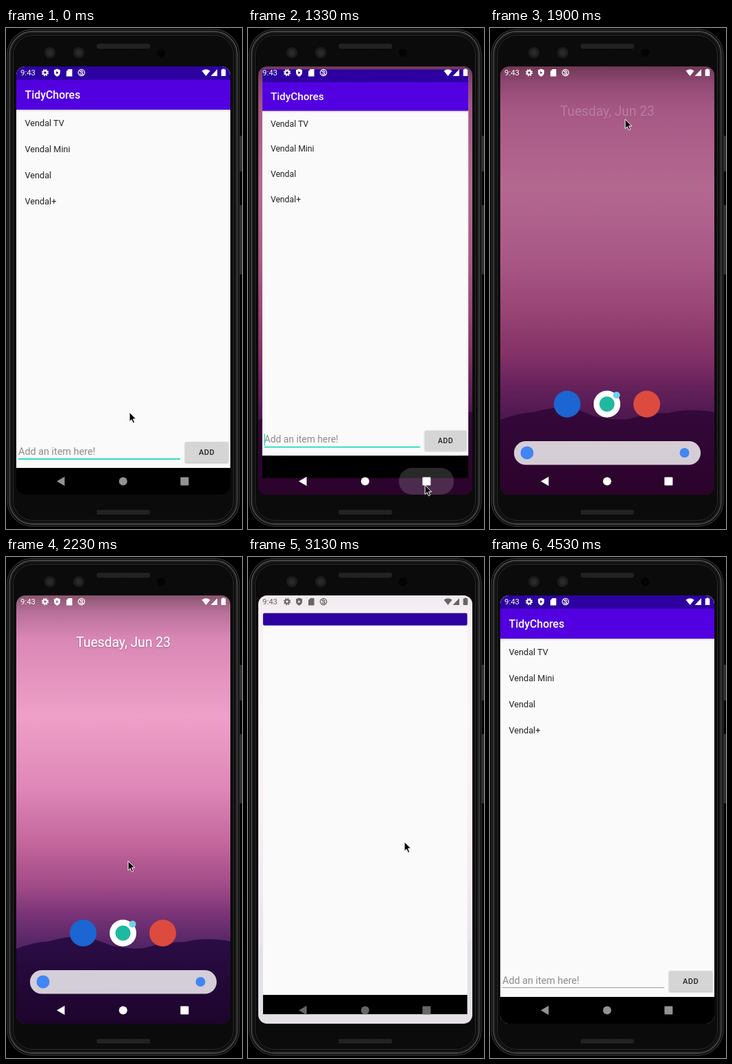
Write an HTML page that moves like this. It is 344 by 730 pixels and loops after 4560 ms.

```html
<!DOCTYPE html>
<html lang="en">
<head>
<meta charset="utf-8">
<style>
  html, body { margin: 0; width: 100%; height: 100%; overflow: hidden; background: #000; }
  svg { display: block; width: 344px; height: 730px; font-family: Roboto, sans-serif; }
</style>
</head>
<body>
<svg id="stage" viewBox="0 0 344 730"></svg>
<script>
const LOOP = 4560;
const items = ['Vendal TV', 'Vendal Mini', 'Vendal', 'Vendal+'];

// label, mark colour, sits on a white disc
const apps = [
  ['Daybooks', '#3f6fd8', 1], ['Lenses', '#4a78d0', 0], ['Pagers', '#dd4b3e', 0], ['Hours', '#5585e0', 0], ['Entries', '#1a8fd6', 1],
  ['Shelf', '#f5b912', 1], ['Gab', '#1a5fd0', 0], ['Racks', '#3f72dc', 0], ['Mails', '#d93a30', 1], ['Dorvit', '#4285f4', 1],
  ['Roam', '#4c9a5c', 0], ['Textings', '#1b66d2', 0], ['Calls', '#0a8ae0', 1], ['Images', '#f0b400', 1], ['Reel Fil…', '#a01030', 1],
  ['Wave Songs', '#f05a20', 1], ['Wave Shop', '#20b8a0', 1], ['Controls', '#1b58c4', 0], ['TidyCho…', '#3ddc84', 0], ['Vidmoor', '#f00000', 1]
];

const rect = (x, y, w, h, fill, more = '') =>
  `<rect x="${x}" y="${y}" width="${w}" height="${h}" fill="${fill}" ${more}/>`;
const circle = (x, y, r, fill, more = '') =>
  `<circle cx="${x}" cy="${y}" r="${r}" fill="${fill}" ${more}/>`;
const text = (x, y, size, fill, str, more = '') =>
  `<text x="${x}" y="${y}" font-size="${size}" fill="${fill}" ${more}>${str}</text>`;
const stops = list => list.map(([at, c]) => `<stop offset="${at}" stop-color="${c}"/>`).join('');

const icon = (x, y, [, colour, disc]) => disc
  ? circle(x, y, 19.5, '#fff', 'filter="url(#soft)"') + circle(x, y, 11, colour)
  : circle(x, y, 19.5, colour);
const badge = (x, y) => circle(x, y, 5, '#6cd3ee');

const hotseat = [11, 16, 2].map((n, i) => icon(112.5 + 58 * i, 548, apps[n])).join('') + badge(184.5, 535);

const grid = apps.map((app, i) => {
  const x = 54.5 + i % 5 * 58, y = 169.5 + Math.floor(i / 5) * 85.2;
  return icon(x, y, app) + text(x, y + 37.5, 9.55, '#666', app[0], 'text-anchor="middle"');
}).join('') + badge(126, 411.5);

const ring = (inset, colour, width) => rect(1 + inset, 1 + inset, 340 - 2 * inset, 726 - 2 * inset,
  'none', `rx="${38 - inset}" stroke="${colour}" stroke-width="${width}"`);

const handset = rect(1, 1, 340, 726, '#0b0b0b', 'rx="38"') +
  ring(1, '#2b2b2b', 1.5) + ring(4, '#555', 1.3) + ring(6, '#1c1c1c', 2) + ring(9.5, '#2c2c2c', 1) +
  rect(340.5, 157, 4, 52, '#303030', 'rx="1"') + rect(340.5, 258, 4, 101, '#303030', 'rx="1"') +
  [23, 702].map(y => rect(132, y, 78, 7, 'url(#mesh)', 'rx="3"')).join('') +
  [64, 106].map(x => circle(x, 36, 8, '#1d1d1d') + circle(x, 36, 4.5, '#292929')).join('') +
  circle(226, 36, 6, '#030303');

const statusIcons =
  text(21, 69, 11.4, 'currentColor', '9:43') +
  `<g fill="none" stroke="currentColor">
    <circle cx="57" cy="65" r="2.8" stroke-width="2"/>
    <circle cx="57" cy="65" r="4.4" stroke-width="1.6" stroke-dasharray="1.9 1.556"/>
    <circle cx="110" cy="65" r="4.7" stroke-width="1.2"/>
    <path d="M107 62l6 6M107.5 66a2.6 2.6 0 0 0 4 1.5M109 62.5a2.6 2.6 0 0 1 3.3 2.8" stroke-width="1.1"/>
  </g>
  <g fill="currentColor">
    <path fill-rule="evenodd" d="M74.5 59.5l4.5 1.7v3.5q0 4-4.5 6q-4.5-2-4.5-6v-3.5zM73.2 63v4.2l3.5-2.1z"/>
    <path d="M91 60h5.5v10.5h-8.5v-7.5z"/>
    <path d="M285.5 62.5q6-4.5 12 0l-6 7.5zM308 60v10h-9.5zM315.5 60.5v-1h3v1h1.8v9.5h-6.6v-9.5z"/>
  </g>`;

const navIcons = `<g fill="currentColor"><path d="M74 660.5l11.5-6.7v13.4z"/>
  <circle cx="170.7" cy="660.5" r="6"/><rect x="254.3" y="654.5" width="12" height="12" rx="1"/></g>`;

const todoApp =
  rect(15, 56, 312, 585, '#fafafa') +
  rect(15, 119, 312, 3, 'url(#shade)') +
  rect(15, 56, 312, 20, '#2d00a0') + rect(15, 75.5, 312, 43.5, '#5200e0') +
  text(27.5, 103, 15.9, '#fff', 'TidyChores', 'font-weight="500"') +
  items.map((s, i) => text(27.5, 143 + 38.1 * i, 12.7, '#222', s)).join('') +
  text(18, 621.5, 14.4, '#8c8c8c', 'Add an item here!') +
  rect(18, 627, 236, 2, '#2fdcc0', 'id="line"') + rect(17.5, 608, 1.5, 18, '#2fdcc0', 'id="caret"') +
  rect(261, 603, 63, 30, '#d5d5d5', 'rx="1.5" filter="url(#soft)"') +
  text(292.5, 622, 11.1, '#222', 'ADD', 'font-weight="500" text-anchor="middle" letter-spacing=".4"') +
  rect(15, 641, 312, 39, '#000', 'id="appNav"') +
  circle(171, 56, 15, '#3ddc84', 'id="cardIcon"');

const stage = document.querySelector('#stage');
stage.innerHTML = `
<defs>
  <clipPath id="screen"><rect x="15" y="56" width="312" height="624" rx="13"/></clipPath>
  <linearGradient id="sky" x2="0" y2="1">${stops([
    [0, '#8a5670'], [.04, '#b8709a'], [.1, '#d987b5'], [.28, '#eea0c8'], [.45, '#df87b8'],
    [.58, '#c2669c'], [.68, '#a04a86'], [.74, '#7c3578'], [.82, '#522465']])}</linearGradient>
  <linearGradient id="hill" x2="0" y2="1">${stops([[0, '#2b0d45'], [1, '#1d042c']])}</linearGradient>
  <linearGradient id="shade" x2="0" y2="1">${stops([[0, '#d4d4d4'], [1, '#fafafa']])}</linearGradient>
  <pattern id="mesh" width="3" height="3" patternUnits="userSpaceOnUse">
    <rect width="3" height="3" fill="#262626"/><rect width="1.5" height="1.5" fill="#151515"/></pattern>
  <filter id="soft" x="-20%" y="-20%" width="140%" height="150%">
    <feDropShadow dx="0" dy="1" stdDeviation="1" flood-opacity=".3"/></filter>
</defs>
${handset}
<g clip-path="url(#screen)">
  ${rect(15, 56, 312, 624, 'url(#sky)')}
  <path d="M15 571Q40 561 62 560Q90 552 110 553Q130 556 150 565Q175 572 200 570Q235 560 260 561Q290 553 327 560V680H15z" fill="url(#hill)"/>
  ${rect(15, 56, 312, 624, '#470028', 'id="dim"')}
  ${text(171, 131, 19.3, '#fff', 'Tuesday, Jun 23', 'id="date" text-anchor="middle" filter="url(#soft)"')}
  ${rect(15, 56, 312, 624, '#fff', 'id="veil"')}
  <g id="hotseat">${hotseat}</g>
  <g id="grid">${grid}</g>
  <g id="search">${rect(35, 602, 272, 34.5, '#fff', 'id="searchBar" rx="17"')}
    ${circle(54, 619, 9.5, '#4285f4')}${circle(283.5, 619, 7, '#4285f4')}</g>
  <g id="splash"><rect fill="#fafafa" rx="2"/><rect fill="#2d00a0" rx="2"/><rect fill="#000"/></g>
  <g id="app">${todoApp}</g>
  ${rect(220, 641, 80, 39, '#fff', 'id="ripple" rx="19"')}
  <g id="status">${statusIcons}</g>
  <g id="nav">${navIcons}</g>
</g>
<path id="pointer" d="M0 0V13.5L3.1 10.7L5.3 15.7L7.6 14.7L5.4 9.8H9.6z" fill="#000" stroke="#fff"/>`;

const $ = Object.fromEntries([...stage.querySelectorAll('[id]')].map(e => [e.id, e]));
const set = (el, attrs) => { for (const k in attrs) el.setAttribute(k, attrs[k]); };
const smooth = k => k * k * (3 - 2 * k);
const linear = k => k;

// Value at time t along [time, value] points
function key(t, points, ease = smooth) {
  const i = points.findIndex(p => t < p[0]);
  if (i === 0) return points[0][1];
  if (i < 0) return points.at(-1)[1];
  const [a, from] = points[i - 1], [b, to] = points[i];
  return from + (to - from) * ease((t - a) / (b - a));
}
const ramp = (t, a, b) => key(t, [[a, 0], [b, 1]]);
const step = (t, first, ...changes) => changes.reduce((v, [at, next]) => t >= at ? next : v, first);

// time, x, y
const pointerPath = [
  [30, 180, 560], [560, 252, 640], [1000, 258, 666], [1380, 258, 666], [1640, 205, 400], [1680, 204, 400],
  [1850, 197, 133], [1920, 197, 133], [2150, 178, 443], [2230, 178, 443], [2410, 182, -14], [2500, 182, -14],
  [2900, 228, 415], [3820, 228, 415], [4280, 254, 560]
];
const pointerX = pointerPath.map(([t, x]) => [t, x]);
const pointerY = pointerPath.map(([t, , y]) => [t, y]);

function drawHome(t) {
  const drawer = ramp(t, 2240, 2410), lift = -510 * drawer;
  const date = ramp(t, 1860, 2000);
  const fade = 1 - ramp(t, 2990, 3090);
  set($.dim, { opacity: .35 * (1 - ramp(t, 1900, 2170)) });
  set($.date, { opacity: date * (1 - drawer), transform: `translate(0 ${4 * date - 4 + lift * .2})` });
  set($.veil, { opacity: .88 * drawer });
  set($.hotseat, { opacity: ramp(t, 1720, 1850) * (1 - drawer) ** 2, transform: `translate(0 ${lift})` });
  set($.grid, { opacity: drawer * fade, transform: `translate(0 ${510 + lift})` });
  set($.search, { opacity: fade, transform: `translate(0 ${lift})` });
  set($.searchBar, { 'fill-opacity': .8 + .1 * drawer });
}

function drawSplash(t) {
  const edge = (a, b, c) => key(t, [[2980, a], [3130, b], [3210, c]], linear);
  const x = edge(209, 22, 15), y = edge(406, 82, 56);
  const width = edge(247, 319.5, 327) - x, bottom = edge(444, 666, 680);
  const top = edge(2, 18, 20), base = edge(3, 28, 39);
  const [page, bar, nav] = $.splash.children;
  set($.splash, { opacity: ramp(t, 2980, 3040) });
  set(page, { x, y, width, height: bottom - y });
  set(bar, { x, y, width, height: top });
  set(nav, { x, y: bottom - base, width, height: base });
}

function drawApp(t) {
  const shrink = ramp(t, 1269, 1569), scale = 1 - .34 * shrink;
  const reopened = t > 2500;
  const dy = 165 * (1 - scale) - 600 * ramp(t, 1680, 1860);
  set($.app, {
    opacity: reopened ? ramp(t, 3215, 3275) : +(t < 1870),
    transform: reopened ? '' : `translate(${171 * (1 - scale)} ${dy}) scale(${scale})`
  });
  set($.appNav, { height: shrink && !reopened ? 34 * Math.min(1, (1 - shrink) / .89) : 39 });
  set($.cardIcon, { opacity: reopened ? 0 : ramp(t, 1500, 1600) });
  set($.line, reopened ? { height: 1, fill: '#999' } : { height: 2, fill: '#2fdcc0' });
  set($.caret, { opacity: step(t, 0, [60, 1], [560, 0], [1060, 1], [2500, 0]) });
}

function draw(now) {
  const t = now % LOOP;
  drawHome(t);
  drawSplash(t);
  drawApp(t);
  set($.pointer, { transform: `translate(${key(t, pointerX)} ${key(t, pointerY)})`, opacity: +(t < 4290) });
  set($.ripple, { opacity: .16 * ramp(t, 1120, 1200) * (1 - ramp(t, 1380, 1520)) });
  set($.status, { color: step(t, '#fff', [2480, '#666'], [3190, '#fff']) });
  set($.nav, { color: step(t, '#929292', [1125, '#fff'], [2480, '#666'], [3230, '#929292']) });
}

const start = performance.now();
(function tick() {
  draw(performance.now() - start);
  requestAnimationFrame(tick);
})();
</script>
</body>
</html>
```
